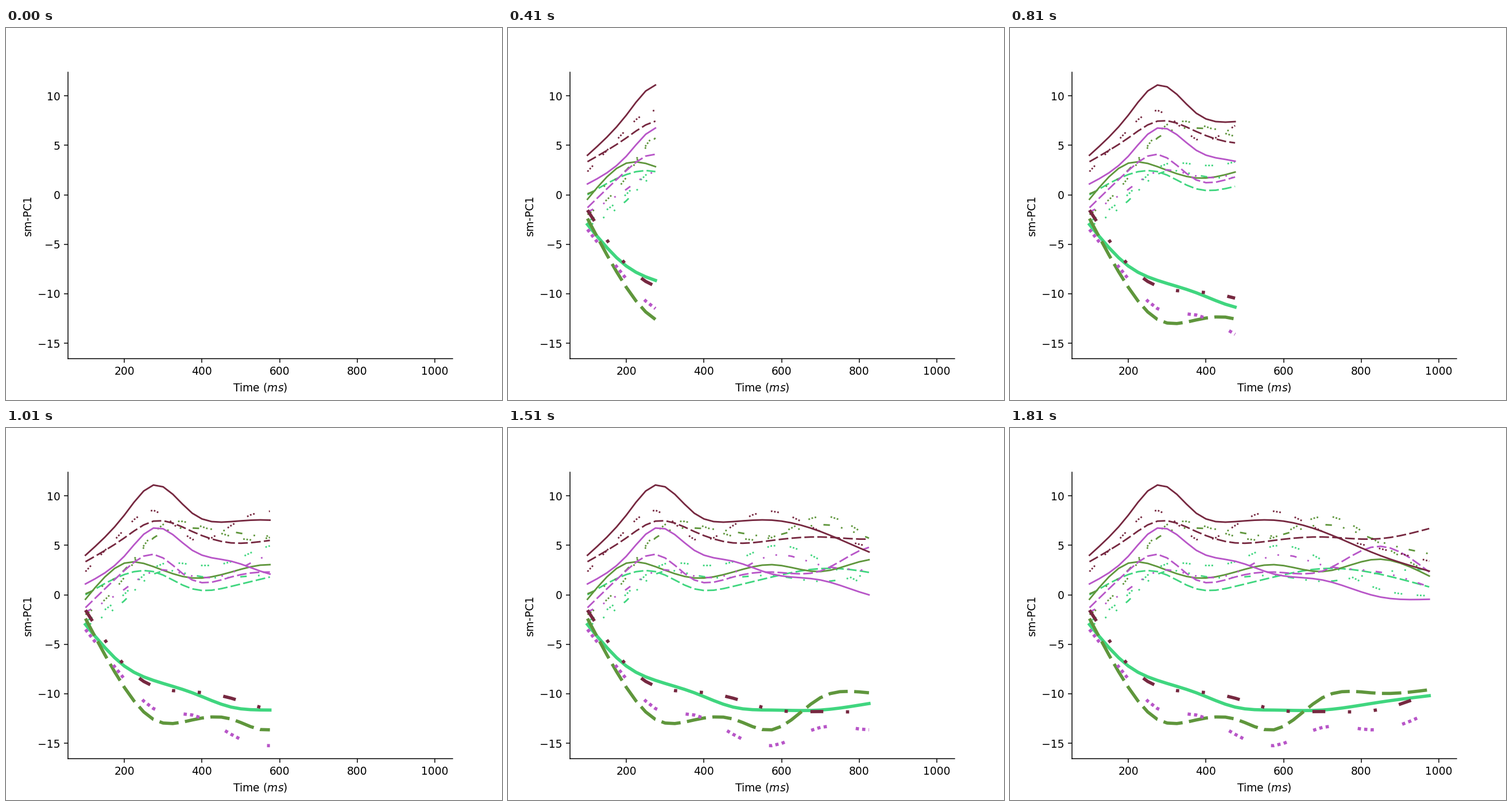
Write a matplotlib script that moves like this. It is 864 by 648 pixels and loops after 1860 ms.

```python
import numpy as np
import matplotlib.pyplot as plt
from matplotlib.animation import FuncAnimation

plt.rcParams["font.family"] = "DejaVu Sans"

# solid, dashed, three dots, dash with two dots
STYLES = ["-", (0, (6, 2)), (0, (1, 1, 1, 1, 1, 9)), (0, (4, 7, 1, 7, 1, 7))]

KEYS = np.array([100, 200, 275, 375, 475, 575, 700, 840, 975])
TIME = np.arange(100, 976, 25)

TICK = 10            # ms per animation step
HOLD = 110           # empty axes at the start
STEP = 50            # ms per new sample
LOOP = HOLD + STEP * (len(TIME) - 1)


def spline(y):
    """Natural cubic spline through the key points, sampled at TIME."""
    h = np.diff(KEYS)
    rate = np.diff(y) / h
    a = np.eye(len(KEYS))
    b = np.zeros(len(KEYS))
    for i in range(1, len(h)):
        a[i, i - 1:i + 2] = h[i - 1], 2 * (h[i - 1] + h[i]), h[i]
        b[i] = 6 * (rate[i] - rate[i - 1])
    m = np.linalg.solve(a, b)
    k = np.clip(np.searchsorted(KEYS, TIME, "right") - 1, 0, len(h) - 1)
    d = TIME - KEYS[k]
    slope = rate[k] - h[k] * (2 * m[k] + m[k + 1]) / 6
    return (np.array(y)[k] + slope * d + m[k] / 2 * d ** 2
            + (m[k + 1] - m[k]) / (6 * h[k]) * d ** 3)


fig, ax = plt.subplots(figsize=(6.4, 4.8), dpi=135)
fig.subplots_adjust(bottom=0.111, top=0.881)
ax.set_xlim(55, 1045)
ax.set_ylim(-16.57, 12.39)
ax.spines[["top", "right"]].set_visible(False)
ax.set_xlabel("Time ($ms$)")
ax.set_ylabel("sm-PC1")

curves = []


def group(color, bold, *rows):
    """One curve per line style; the bold one is twice as wide."""
    for i, (style, row) in enumerate(zip(STYLES, rows)):
        line, = ax.plot([], [], color=color, linestyle=style,
                        linewidth=3 if i == bold else 1.5)
        curves.append((line, spline(row)))


group("#40d67f", 0,
      [-3.0, -7.2, -8.65, -9.9, -11.35, -11.65, -11.65, -10.9, -10.2],
      [0, 2.05, 2.35, 0.6, 0.85, 1.8, 2.65, 2.15, 0.8],
      [-2.7, 0.05, 2.75, 3.05, 3.35, 4.95, 3.5, 0.65, -0.1],
      [-3.2, -0.6, 2.1, 2.0, 1.75, 1.95, 1.35, 2.2, 2.6])
group("#5f963c", 1,
      [-0.45, 3.2, 2.85, 1.7, 2.3, 3.05, 2.35, 3.6, 1.9],
      [-2.4, -9.35, -12.6, -12.65, -12.55, -13.65, -10.4, -9.95, -9.6],
      [-2.0, 1.75, 6.3, 7.2, 5.9, 5.8, 7.95, 5.4, 2.2],
      [0.1, 2.5, 5.75, 6.75, 6.4, 5.95, 7.1, 5.5, 4.15])
group("#b856c8", 2,
      [1.1, 3.9, 6.75, 4.5, 3.4, 2.1, 1.5, -0.15, -0.45],
      [-1.3, 2.45, 4.1, 1.5, 1.8, 2.3, 2.4, 4.9, 2.3],
      [-3.5, -8.5, -11.5, -12.15, -14.1, -15.25, -13.4, -13.65, -11.9],
      [-1.75, 0.55, 2.4, 1.9, 2.2, 4.0, 3.0, 2.35, 0.8])
group("#762840", 3,
      [4.0, 8.05, 11.1, 8.25, 7.4, 7.55, 6.4, 4.1, 2.4],
      [3.35, 5.75, 7.45, 6.4, 5.25, 5.5, 5.85, 5.65, 6.7],
      [2.35, 6.6, 8.55, 5.6, 7.0, 8.45, 6.4, 4.75, 3.4],
      [-1.55, -7.1, -9.25, -9.8, -10.45, -11.6, -11.8, -11.65, -9.95])


def update(i):
    t = i * TICK
    n = 0 if t < HOLD else (t - HOLD) // STEP + 2
    for line, y in curves:
        line.set_data(TIME[:n], y[:n])
    return [line for line, _ in curves]


anim = FuncAnimation(fig, update, frames=LOOP // TICK, interval=TICK,
                     repeat=True, repeat_delay=0)
plt.show()
```
